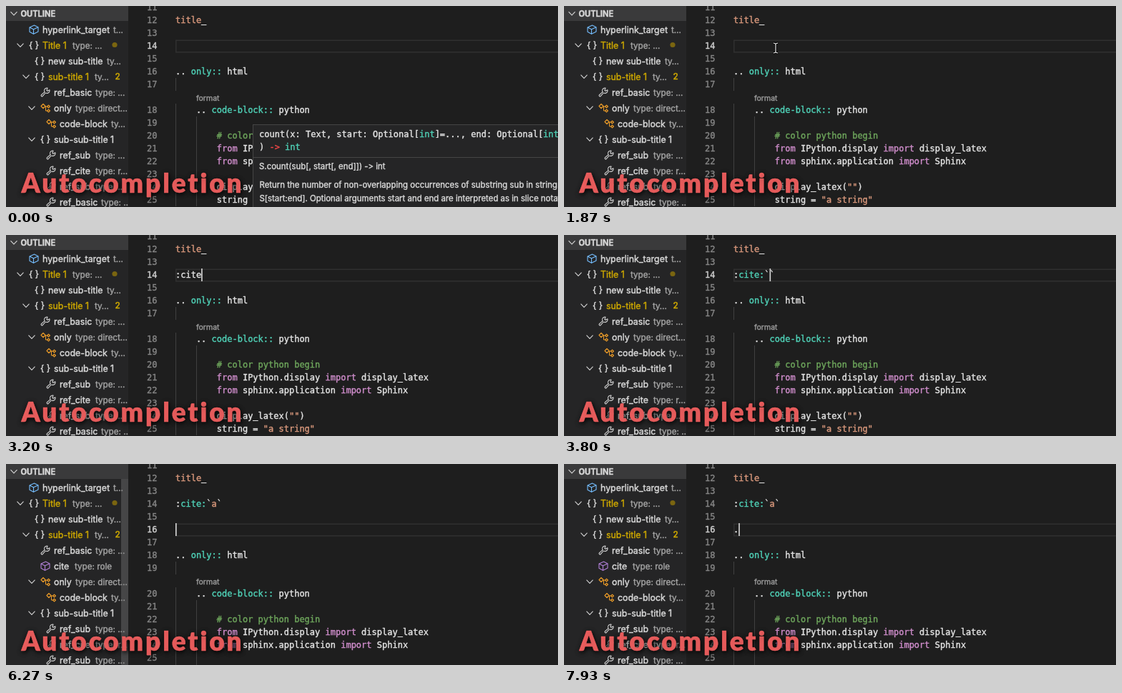
Recreate the animation shown at these times as an HTML page with a canvas. Size 772 by 282 pixels, loop 8 s.

```html
<!DOCTYPE html>
<html lang="en">
<head>
<meta charset="utf-8">
<title>Autocompletion</title>
<style>
  html, body { margin: 0; width: 100%; height: 100%; overflow: hidden; background: #1e1e1e; }
  canvas { display: block; width: 772px; height: 282px; }
</style>
</head>
<body>
<canvas id="stage" width="772" height="282"></canvas>
<script>
const ctx = document.getElementById('stage').getContext('2d');
ctx.lineJoin = 'round';
const LOOP = 8000, LEFT = 237, INDENT = 28.9, CHAR = 7.224, SIDEBAR = 171;
const MONO = '12px "DejaVu Sans Mono", monospace';
const MONO_BOLD = 'bold ' + MONO;
const ui = (size, weight = 400) => `${weight} ${size}px Inter, sans-serif`;

const WHITE = '#e4e4e4', TEAL = '#4fd0b6', ORANGE = '#d9987c', PURPLE = '#cf8dcb',
  GREEN = '#6ea65c', GREY = '#858585', RED = '#f44747', BLUE = '#18a3ff',
  LABEL = '#d8d8d8', DETAIL = '#a4a4a4', WARN = '#cca700',
  VIOLET = '#b180d7', SKY = '#75beff', AMBER = '#ee9d28';

// Editor state after each key press; the caret blink restarts with each one.
const CITE = ':cite:`a`';
const keys = [
  { at: -850, text: '', col: 0 },
  { at: 2130, text: ':', col: 1 },
  { at: 2230, text: ':c', col: 2 },
  { at: 2330, text: ':ci', col: 3 },
  { at: 3070, text: ':cite', col: 5 },
  { at: 3330, text: ':cite:', col: 6 },
  { at: 3600, text: ':cite:``', col: 7 },
  { at: 5200, text: CITE, col: 8 },
  { at: 5650, text: CITE, col: 9 },
  { at: 5760, text: CITE, col: 0, added: 1 },
  { at: 5870, text: CITE, col: 0, added: 2 },
  { at: 7600, text: CITE, col: 1, added: 2, tail: '.' }
];
const HOVER_END = 840, POPUP_START = 2230, POPUP_END = 3070, OUTLINE_UPDATE = 6130;

// Each line: indent level, then color and text pairs.
const body = [
  [0, WHITE, '.. ', TEAL, 'only::', WHITE, ' html'],
  [0],
  [1, WHITE, '.. ', TEAL, 'code-block::', WHITE, ' python'],
  [0],
  [2, GREEN, '# color python begin'],
  [2, PURPLE, 'from', WHITE, ' IPython.display ', PURPLE, 'import', WHITE, ' display_latex'],
  [2, PURPLE, 'from', WHITE, ' sphinx.application ', PURPLE, 'import', WHITE, ' Sphinx'],
  [0],
  [2, WHITE, 'display_latex(', ORANGE, '""', WHITE, ')'],
  [2, WHITE, 'string = ', ORANGE, '"a string"']
];

// Outline rows: icon, icon x, name, name x, detail, detail x, chevron x.
const outline = [
  ['cube', 39, 'hyperlink_target', 51, 't…', 150],
  ['braces', 39, 'Title 1', 51, 'type: …', 93, 20],
  ['braces', 47, 'new sub-title', 59, 'ty…', 141],
  ['braces', 47, 'sub-title 1', 59, 'ty…', 124, 28],
  ['wrench', 55, 'ref_basic', 67, 'type: …', 125],
  ['tree', 55, 'only', 67, 'type: direct…', 97, 36],
  ['tree', 63, 'code-block', 75, 'ty…', 147],
  ['braces', 55, 'sub-sub-title 1', 67, '', 0, 36],
  ['wrench', 63, 'ref_sub', 75, 'type: …', 125],
  ['wrench', 63, 'ref_cite', 75, 'type: r…', 125],
  ['wrench', 63, 'ref_sub', 75, 'type: …', 125],
  ['wrench', 63, 'ref_basic', 75, 'type: …', 133],
  ['wrench', 63, 'ref_sub', 75, 'type: …', 125]
];
const citeRow = ['role', 55, 'cite', 67, 'type: role', 96];

// Brackets mark the matched letters.
const suggestions = ['[ci]tation-reference', '[ci]te', '[c]mdopt[i]on', '[c]pp:al[i]as',
  '[c]pp:un[i]on', '[c]:funct[i]on', '[c]pp:funct[i]on'];

// A hairline outline gives the text its slightly heavy smoothing.
function text(str, x, y, color, font = MONO) {
  ctx.font = font;
  ctx.fillStyle = ctx.strokeStyle = color;
  ctx.lineWidth = 0.4;
  ctx.fillText(str, x, y);
  ctx.strokeText(str, x, y);
  return x + ctx.measureText(str).width;
}

function code(x, y, pairs, font) {
  for (let i = 0; i < pairs.length; i += 2) x = text(pairs[i + 1], x, y, pairs[i], font);
}

function rect(x, y, w, h, color) {
  ctx.fillStyle = color;
  ctx.fillRect(x, y, w, h);
}

function panel(x, y, w, h) {
  rect(x, y, w, h, '#454545');
  rect(x + 1, y + 1, w - 2, h - 2, '#252526');
}

function stroke(points, color, width = 1, close = false) {
  ctx.beginPath();
  for (const [x, y] of points) ctx.lineTo(x, y);
  if (close) ctx.closePath();
  ctx.strokeStyle = color;
  ctx.lineWidth = width;
  ctx.stroke();
}

const chevron = (x, y) => stroke([[x - 4.5, y - 2.3], [x, y + 2.3], [x + 4.5, y - 2.3]], LABEL, 1.1);

function cube(color) {
  stroke([[-6, -3], [0.5, -6], [6, -3.3], [6, 3], [-0.5, 6.3], [-6, 3.3]], color, 1.1, true);
  stroke([[-6, -3], [-0.5, -0.3], [6, -3.3]], color, 1.1);
  stroke([[-0.5, -0.3], [-0.5, 6.3]], color, 1.1);
}

const icons = {
  cube: () => cube(SKY),
  role: () => cube(VIOLET),
  braces: () => text('{ }', -7, 4, LABEL, ui(12.4)),
  wrench() {
    ctx.beginPath();
    ctx.moveTo(0.2, 1);
    ctx.lineTo(-4, 5.6);
    ctx.arc(-4.6, 4.6, 1.3, 1, 3.9);
    ctx.lineTo(-1, -0.3);
    ctx.arc(2.3, -2.3, 3.7, 2.5, 4.9);
    ctx.lineTo(1.9, -2.6);
    ctx.lineTo(3, -1.7);
    ctx.lineTo(5.9, -3.2);
    ctx.arc(2.3, -2.3, 3.7, -0.1, 2.1);
    ctx.strokeStyle = LABEL;
    ctx.lineWidth = 1.1;
    ctx.stroke();
  },
  tree() {
    const diamond = (x, y, r) => stroke([[x - r, y], [x, y - r], [x + r, y], [x, y + r]], AMBER, 1.2, true);
    diamond(-3, -2.5, 3);
    diamond(4.5, -2, 1.9);
    diamond(4.5, 4, 1.9);
    stroke([[0, -2], [2.6, -2]], AMBER);
    stroke([[0.5, -2], [0.5, 4], [2.6, 4]], AMBER);
  }
};

function icon(name, x, y) {
  ctx.save();
  ctx.translate(x, y);
  icons[name]();
  ctx.restore();
}

function drawOutline(t) {
  const rows = [...outline];
  const updated = t >= OUTLINE_UPDATE;
  if (updated) rows.splice(5, 0, citeRow);
  ctx.save();
  ctx.beginPath();
  ctx.rect(0, 0, SIDEBAR, 282);
  ctx.clip();
  rect(0, 0, SIDEBAR, 282, '#252526');
  rect(0, 0, SIDEBAR, 21, '#3a3a3b');
  chevron(11, 10.5);
  text('OUTLINE', 20.5, 14.5, LABEL, ui(11.1, 700));
  rows.forEach(([kind, iconX, name, nameX, detail, detailX, chevronX], i) => {
    const y = 33 + i * 22;
    const warned = i === 1 || i === 3;
    if (chevronX) chevron(chevronX, y);
    icon(kind, iconX, y);
    text(name, nameX, y + 4.5, warned ? WARN : LABEL, ui(12.4));
    text(detail, detailX, y + 4.5, DETAIL, ui(11.7));
  });
  ctx.beginPath();
  ctx.arc(152, 54.5, 3.6, 0, Math.PI * 2);
  ctx.fillStyle = '#7a6510';
  ctx.fill();
  text('2', 152.5, 102.5, WARN, ui(11.7, 500));
  if (updated) {
    // The scrollbar flashes up, then fades.
    const fade = Math.min(1, Math.max(0, 1 - (t - OUTLINE_UPDATE - 500) / 800));
    rect(161, 21, 10, 261, `rgba(121, 121, 121, ${0.4 * fade})`);
  }
  ctx.restore();
}

function drawEditor(t, key) {
  const added = key.added || 0;
  const current = 14 + added;
  const lensLine = 18 + added;
  const lineY = n => 2 + (n - 11) * 18 + (n >= lensLine ? 18 : 0);
  const currentY = lineY(current);

  rect(LEFT, currentY - 8.5, 540, 18, '#303030');
  rect(LEFT + 1.5, currentY - 7, 540, 15, '#1e1e1e');

  for (let n = 11; n <= 25; n++) {
    text(n, 197, lineY(n) + 4, n === current ? '#d0d0d0' : GREY);
  }
  code(LEFT, lineY(12) + 4, [ORANGE, 'title', WHITE, '_']);

  const isRole = key.text.startsWith(':cite:');
  [...key.text].forEach((ch, i) => {
    const color = ch === 'a' ? ORANGE : isRole && i > 0 && i < 6 ? TEAL : WHITE;
    text(ch, LEFT + i * CHAR, lineY(14) + 4, color);
  });
  if (key.tail) text(key.tail, LEFT, currentY + 4, WHITE);

  body.forEach(([indent, ...pairs], i) => {
    const y = lineY(16 + added + i);
    if (i >= 1) rect(LEFT, y - 9, 1, 18, '#404040');
    if (i >= 3) rect(266, y - 9, 1, 18, '#404040');
    code(LEFT + indent * INDENT, y + 4, pairs);
  });
  text('format', 266, lineY(lensLine) - 13, '#999999', ui(10.5));

  if ((t - key.at) % 1000 < 500) {
    rect(LEFT + key.col * CHAR, currentY - 9, 1.6, 18, LABEL);
  }
}

function drawHover() {
  panel(345, 166, 440, 130);
  code(354, 184, [WHITE, 'count(x: Text, start: Optional[', TEAL, 'int', WHITE, ']=..., end: Optional[', TEAL, 'int']);
  code(354, 202, [WHITE, ') ', RED, '->', TEAL, ' int']);
  rect(346, 212, 430, 1, '#454545');
  const font = ui(11.45);
  // Split inside the arrow so that it does not become a ligature.
  code(354, 229, [LABEL, 'S.count(sub[, start[, end]]) -', LABEL, '> int'], font);
  text('Return the number of non-overlapping occurrences of substring sub in string', 354.5, 255, LABEL, font);
  text('S[start:end]. Optional arguments start and end are interpreted as in slice notation.', 354.5, 273.5, LABEL, font);
}

function drawPopup() {
  panel(232, 65, 329, 127);
  rect(233, 84, 327, 18, '#062f4a');
  suggestions.forEach((item, i) => {
    const y = 75 + i * 18;
    icon('role', 245, y);
    let x = 256.5;
    item.split(/[[\]]/).forEach((part, j) => {
      x = j % 2 ? text(part, x, y + 4, BLUE, MONO_BOLD) : text(part, x, y + 4, WHITE);
    });
  });
  panel(561, 65, 220, 63);
  text('Module: sphinxcontrib.bibtex.', 567, 83, DETAIL);
  rect(562, 97, 215, 1, '#454545');
  text('Class for processing the :rst:role:`cite`', 567, 117, LABEL, ui(11.45));
}

function drawPointer(t) {
  const p = Math.min(1, Math.max(0, (t - 250) / 480));
  const ease = p * p * (3 - 2 * p);
  const x = 400 - 104 * ease, y = 300 - 241 * ease;
  for (const [color, width] of [['#000', 3], ['#eee', 1.2]]) {
    stroke([[x, y - 6], [x, y + 6]], color, width);
    stroke([[x - 3, y - 7], [x, y - 6], [x + 3, y - 7]], color, width);
    stroke([[x - 3, y + 7], [x, y + 6], [x + 3, y + 7]], color, width);
  }
}

function drawCaption() {
  ctx.save();
  ctx.letterSpacing = '2.9px';
  ctx.shadowColor = '#000';
  ctx.shadowBlur = 6;
  ctx.shadowOffsetX = 1;
  ctx.shadowOffsetY = 2;
  text('Autocompletion', 21.5, 262, '#f76262', '900 37px Lato, sans-serif');
  ctx.restore();
}

function draw(t) {
  const key = keys.filter(k => k.at <= t).pop();
  rect(0, 0, 772, 282, '#1e1e1e');
  drawEditor(t, key);
  drawOutline(t);
  if (t < HOVER_END) drawHover();
  if (t >= POPUP_START && t < POPUP_END) drawPopup();
  if (t < keys[1].at) drawPointer(t);
  drawCaption();
}

let start;
function tick(now) {
  start ??= now;
  draw((now - start) % LOOP);
  requestAnimationFrame(tick);
}
requestAnimationFrame(tick);
</script>
</body>
</html>
```
